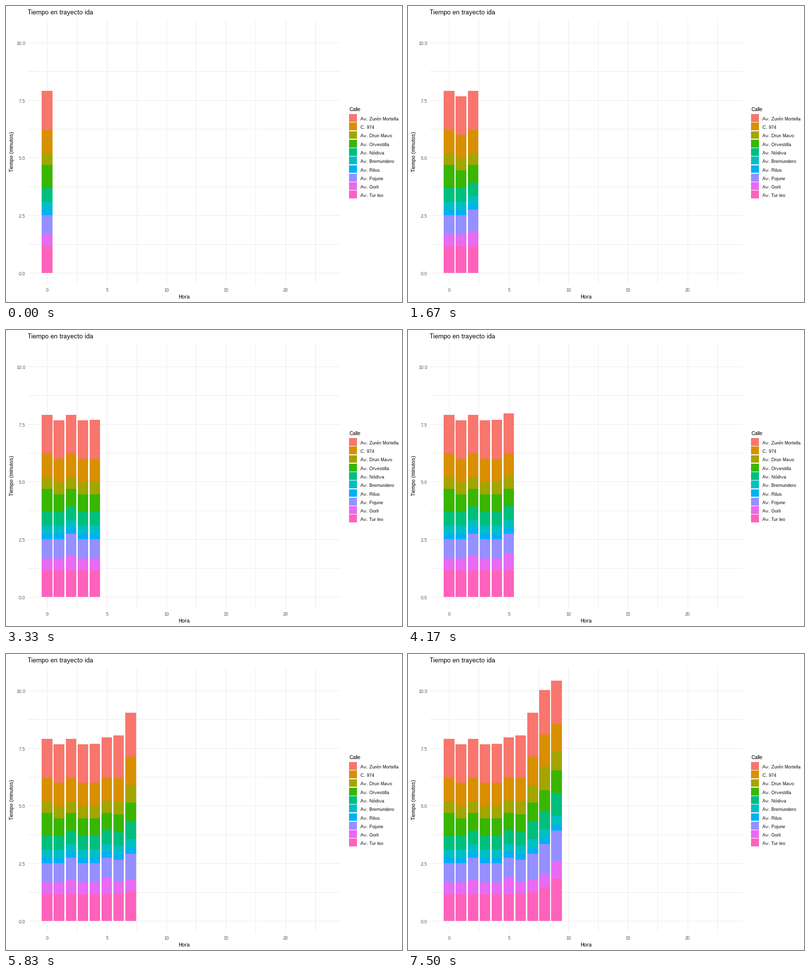
Recreate the animation shown at these times as a matplotlib script. Size 800 by 600 pixels, loop 8000 ms.

```python
import math

import matplotlib.pyplot as plt
from matplotlib.animation import FuncAnimation
from matplotlib.collections import PolyCollection

W, H, DPI = 800, 600, 100
FRAMES, INTERVAL = 400, 20
HOURS = 10

# Crisp small type on whole pixels, without kerning
plt.rcParams.update({
    "font.family": "Liberation Sans",
    "text.hinting": "default",
    "text.hinting_factor": 1,
    "text.kerning_factor": 6,
})

GRID, TICK = "#EBEBEB", "#4D4D4D"
LEFT, RIGHT, TOP, BOTTOM = 44, 676, 27, 565
BASE = 541.45          # pixel row of zero minutes
STEP = 58.37           # pixels between grid rows, 75 seconds apart
SECOND = STEP / 75

# name, colour, quiet seconds, rush-hour extra seconds, peak hour, spread
STREETS = [
    ("Av. Zurén Mortella", "#F8766D", 101, 15, 7.8, 2.2),
    ("C. 974", "#D89000", 61, 23, 7.9, 1.25),
    ("Av. Drun Mavo", "#A3A500", 31, 31, 8.1, 1.25),
    ("Av. Orvestilla", "#39B600", 46, 14, 9.2, 1.6),
    ("Av. Nódiva", "#00BF7D", 36, 24, 9.3, 1.5),
    ("Av. Bremundero", "#00BFC4", 21, 3, 8, 2),
    ("Av. Rilus", "#00B0F6", 14, 1, 9, 1),
    ("Av. Fojune", "#9590FF", 50, 32, 8.6, 2.1),
    ("Av. Gorli", "#E76BF3", 31, 12, 9, 0.7),
    ("Av. Tur leo", "#FF62BC", 70, 113, 12, 3),
]
COLORS = [street[1] for street in STREETS]

# Isolated delays in seconds, by hour and street
DELAYS = {
    (0, "Av. Orvestilla"): 14,
    (2, "Av. Gorli"): 9,
    (2, "Av. Fojune"): 5,
    (5, "Av. Gorli"): 12,
    (7, "Av. Nódiva"): 9,
}

fig = plt.figure(figsize=(W / DPI, H / DPI), dpi=DPI, facecolor="white")
ax = fig.add_axes([0, 0, 1, 1])
ax.set_xlim(0, W)
ax.set_ylim(H, 0)
ax.axis("off")


def box(x0, y0, x1, y1):
    return [(x0, y0), (x1, y0), (x1, y1), (x0, y1)]


def fill(boxes, colors, z):
    shapes = PolyCollection(boxes, facecolors=colors, edgecolors="none",
                            linewidths=0, antialiaseds=False, zorder=z)
    ax.add_collection(shapes, autolim=False)
    return shapes


def label(x, y, text, px, color="black", **kw):
    # The small surplus keeps the hinted size from rounding down
    ax.text(x, y, text, fontsize=(px + 0.02) * 72 / DPI, color=color,
            va="baseline", **kw)


def draw_grid():
    rows = [round(BASE - 0.5 - STEP * k) for k in range(9)]
    cols = [round(83.2 + 60.18 * k) for k in range(10)]
    lines = [box(LEFT, y, RIGHT, y + 1) for y in rows]
    lines += [box(x, TOP, x + 1, BOTTOM) for x in cols]
    fill(lines, GRID, 1)
    for k, y in enumerate(rows[::2]):
        label(39, y + 5, f"{2.5 * k:.1f}", 9, TICK, ha="right")
    for k, x in enumerate(cols[::2]):
        label(x, 579, str(5 * k), 9, TICK, ha="center")


def draw_legend():
    label(693, 213, "Calle", 11)
    tops = [218.96 + 17.28 * i for i in range(len(STREETS))]
    fill([box(693, round(y), 709, round(y + 15.78)) for y in tops], COLORS, 2)
    for street, y in zip(STREETS, tops):
        label(716, round(y + 12.94), street[0], 9)


def travel_time(hour, name, quiet, extra, peak, spread):
    rush = math.exp(-((hour - peak) / spread) ** 2)
    return quiet + extra * rush + DELAYS.get((hour, name), 0)


def make_bar(hour):
    x0 = round(72.35 + 24.1 * hour)
    x1 = round(93.85 + 24.1 * hour)
    boxes, low = [], BASE
    for name, _, *rule in reversed(STREETS):
        high = low - SECOND * travel_time(hour, name, *rule)
        boxes.append(box(x0, round(high), x1, round(low)))
        low = high
    return fill(boxes, COLORS[::-1], 2)


draw_grid()
draw_legend()
label(44, 17, "Tiempo en trayecto ida", 13)
label(360, 593, "Hora", 11, ha="center")
label(15, 295, "Tiempo (minutos)", 11, ha="center", rotation=90,
      rotation_mode="anchor")
bars = [make_bar(hour) for hour in range(HOURS)]


def update(frame):
    # A new hour appears every 5/6 of a second
    for hour, bar in enumerate(bars):
        bar.set_visible(frame >= hour * 125 // 3)
    return bars


anim = FuncAnimation(fig, update, frames=FRAMES, interval=INTERVAL,
                     init_func=lambda: update(0), repeat=True, repeat_delay=0)
plt.show()
```
